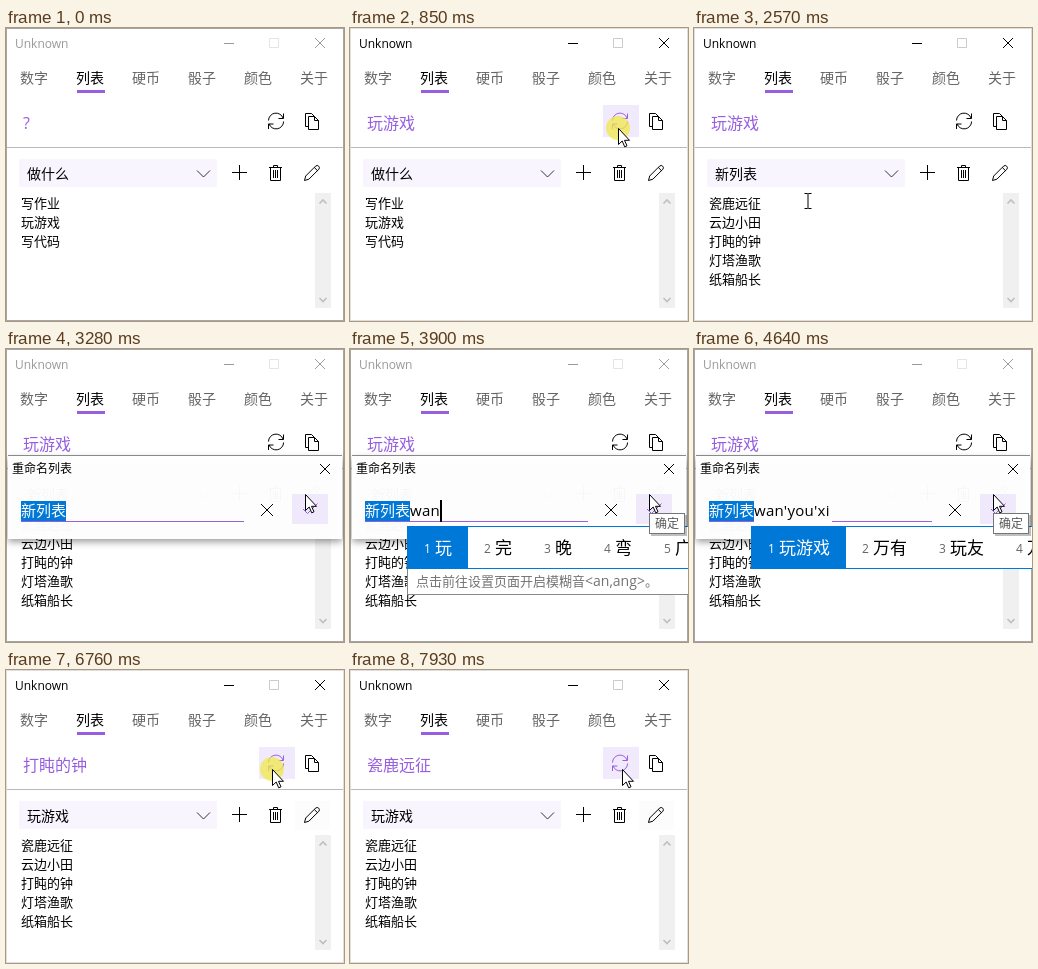
Animation, 338 px wide and 293 px high, one loop 8 s. Source, as an HTML page:

```html
<!DOCTYPE html>
<html lang="zh-CN">
<head>
<meta charset="utf-8">
<title>Unknown</title>
<style>
  html, body { margin: 0; width: 100%; height: 100%; overflow: hidden; background: #fff; }
  svg { display: block; width: 338px; height: 293px; font: 14px "Open Sans", "Noto Sans CJK SC", "Noto Sans CJK", sans-serif; }
  text { white-space: pre; }
  .line { fill: none; stroke: currentColor; }
  .caption { color: #000; font-size: 12px; }
  .caption .max { color: #ccc; }
  .away .caption { color: #999; }
  .away .caption .max { color: #e4e4e4; }
  .edge { fill: none; stroke: #dedede; }
  .away .edge { stroke: #a6a6a6; }
  .tabs { fill: #666; }
  .tabs .on { fill: #000; }
  .list { font-size: 13px; }
  .accent { fill: #975fe0; }
  .btn { color: #000; }
  .btn rect { fill: #fff; }
  .btn.saved rect { fill: #fcfcfc; }
  .btn.hot { color: #975fe0; }
  .btn.hot rect { fill: #f1e9fc; }
  #combo { fill: #f8f5fe; }
  #combo.hot { fill: #e8dcf9; }
</style>
</head>
<body>
<svg id="stage" viewBox="0 0 338 293">
  <defs>
    <clipPath id="slide"><rect id="slideBox" x="10" y="159" width="206" height="0"/></clipPath>
    <filter id="shadow" x="-10%" y="-20%" width="120%" height="150%">
      <feDropShadow dx="0" dy="3" stdDeviation="3.500" flood-color="#000" flood-opacity=".4"/>
    </filter>
  </defs>
  <rect width="338" height="293" fill="#fff"/>

  <g class="caption">
    <text x="9" y="20" fill="currentColor">Unknown</text>
    <path class="line" d="M218 15.500h10"/>
    <path class="line max" d="M263.500 10.500h9v9h-9z"/>
    <path class="line" d="M309 10l10 10M319 10l-10 10"/>
  </g>
  <g class="tabs" id="tabs"></g>
  <rect class="accent" x="71" y="62" width="28" height="3"/>
  <text class="accent" id="result" x="17" y="101" font-size="16"></text>

  <g class="btn" data-x="253" data-y="77">
    <rect x="253" y="77" width="36" height="32"/>
    <path class="line" d="M262.500 92.500a7.500 7.500 0 0 1 14.600-2.300M277.500 85.500v5h-5M277.600 93.500a7.500 7.500 0 0 1-14.600 2.300M262.500 101v-5h5"/>
  </g>
  <g class="btn" data-x="289" data-y="77">
    <rect x="289" y="77" width="36" height="32"/>
    <path class="line" d="M302.500 98.500h-3v-13h6l3 3M302.500 88.500h6l4 4v9h-10zM308.500 88.500v4h4"/>
  </g>
  <path d="M0 119.500h338" stroke="#b9b9b9"/>

  <rect id="combo" x="13" y="131" width="198" height="28"/>
  <text id="choice" x="21" y="151"></text>
  <path class="line" d="M191 142.500l6.500 6.500l6.500-6.500" color="#333"/>
  <g class="btn" data-x="216" data-y="129">
    <rect x="216" y="131" width="34" height="29"/>
    <path class="line" d="M226 144.500h15M233.500 137v15"/>
  </g>
  <g class="btn" data-x="252" data-y="129">
    <rect x="252" y="131" width="35" height="29"/>
    <path class="line" d="M263 139.500h13M267.500 139v-1.500h4v1.500M264.500 139.500v13h10v-13M267.500 142v8M269.500 142v8M271.500 142v8"/>
  </g>
  <g class="btn" data-x="288" data-y="129" id="pencil">
    <rect x="289" y="131" width="35" height="29"/>
    <path class="line" d="M298.500 152.500l1.200-4.500l10-10q1.600-1.200 3 .2t.2 3l-10 10zM308.300 139.500l3.200 3.200"/>
  </g>

  <g class="list" id="list"></g>
  <rect x="309" y="165" width="16" height="115" fill="#f0f0f0"/>
  <path d="M313.500 175.500l3.500-3.500l3.500 3.500M313.500 270l3.500 3.500l3.500-3.500" fill="none" stroke="#bfbfbf" stroke-width="1.600"/>

  <g id="popup" clip-path="url(#slide)">
    <rect x="13.500" y="159.500" width="197" height="39" fill="#fff" stroke="#ddd"/>
    <rect id="pick" x="14" width="196" height="19" fill="#e8dcf9"/>
    <text x="21" y="174">做什么</text>
    <text x="21" y="194">新列表</text>
  </g>
  <rect class="edge" x=".5" y=".5" width="337" height="292"/>

  <g id="dialog">
    <rect x="2" y="107" width="334" height="83" fill="#fff" fill-opacity=".96" filter="url(#shadow)"/>
    <path d="M2 106.500h334" stroke="#8a8a8a"/>
    <text x="6" y="124" font-size="12">重命名列表</text>
    <path class="line" d="M314 115l10 10M324 115l-10 10M255 155l12 12M267 155l-12 12"/>
    <rect x="286" y="145" width="36" height="30" fill="#f0e8fb"/>
    <path d="M297 160l4.500 4.500l10-10" fill="none" stroke="#975fe0"/>
    <path d="M15 172.500h223" stroke="#975fe0"/>
    <rect id="cover" x="60" y="172" height="1" fill="#fff"/>
    <rect id="mark" x="15" y="152" width="45" height="20" fill="#0078d7"/>
    <g font-size="15">
      <text id="name" x="15" y="167"></text>
      <text id="typed" x="60" y="167" letter-spacing=".25"></text>
    </g>
    <rect id="caret" y="151" width="2" height="22"/>
  </g>

  <g id="ime">
    <g id="hint">
      <rect x="57.500" y="219.500" width="300" height="26" fill="#fff" stroke="#888"/>
      <text x="66" y="237" font-size="13" fill="#737373">点击前往设置页面开启模糊音<tspan font-size="14">&lt;an,ang&gt;</tspan>。</text>
    </g>
    <rect x="57.500" y="177.500" width="300" height="42" fill="#fff" stroke="#0078d7"/>
    <g id="cells"></g>
  </g>

  <g id="tip">
    <rect x="301" y="166" width="36" height="21" opacity=".25"/>
    <rect x="299.500" y="164.500" width="35" height="20" fill="#fff" stroke="#767676"/>
    <text x="305" y="179" font-size="12" fill="#575757">确定</text>
  </g>

  <g id="pointer">
    <circle id="press" r="12" fill="#efe84a" opacity=".75"/>
    <path id="arrow" d="M.5.500v16l3.700-3.500l2.500 5.800l2.300-1l-2.500-5.500h5z" fill="#fff" stroke="#000"/>
    <path id="beam" d="M-3.500-7.500h3l.5.500l.5-.5h3M0-7v14M-3.500 7.500h3l.5-.5l.5.500h3" fill="none" stroke="#000"/>
  </g>
</svg>
<script>
const LOOP = 8000, ACTIVE = 760, OPEN = 2010, PICKED = 2440, ASK = 3280, COMMIT = 4820, DONE = 5290;
const $ = id => document.getElementById(id);
const todo = ["写作业", "玩游戏", "写代码"];
const games = ["瓷鹿远征", "云边小田", "打盹的钟", "灯塔渔歌", "纸箱船长"];

const results = [[0, "?"], [ACTIVE, "玩游戏"], [6760, games[2]], [7560, games[3]], [7760, games[0]]];
const choices = [[0, "做什么"], [PICKED, "新列表"], [DONE, "玩游戏"]];
const clicks = [[740, 870], [1830, 2010], [2440, 2530], [3160, 3240], [5200, 5280], [6700, 6800], [7500, 7600], [7700, 7800]];

// time, typed letters, candidates, hint row
const typing = [
  [0, "", "", false],
  [3430, "w", "我 为 无 问 玩", false],
  [3560, "wa", "哇 挖 娃 瓦 蛙", false],
  [3700, "wan", "玩 完 晚 弯 广", true],
  [4060, "wan'y", "万一 玩呀 玩游 万亿", false],
  [4260, "wan'yo", "玩哟 万一 玩游 玩", true],
  [4410, "wan'you", "万有 玩友 玩游 万", true],
  [4490, "wan'you'x", "玩游戏 万有 玩友 万", false],
  [4640, "wan'you'xi", "玩游戏 万有 玩友 万", false],
  [COMMIT, "", "", false]
];

// pointer stops: time, x, y
const route = [
  [110, 340, 200], [400, 300, 140], [650, 268, 100], [950, 268, 100], [1030, 267, 104],
  [1260, 267, 104], [1340, 281, 110], [1600, 232, 132], [1840, 189, 150], [2000, 189, 150],
  [2060, 200, 154], [2260, 125, 179], [2440, 125, 179], [2570, 114, 173], [2680, 145, 166],
  [2960, 285, 135], [3080, 303, 145], [3160, 299, 145], [5290, 299, 145], [5740, 202, 168],
  [5970, 219, 154], [6120, 219, 154], [6520, 266, 99], [7500, 266, 99], [7700, 271, 101], [7880, 272, 99]
];

const rowAt = (rows, t) => rows.findLast(r => r[0] <= t) || rows[0];
const show = (id, on) => { $(id).style.display = on ? "" : "none"; };
const within = (t, a, b) => t >= a && t < b;

function put(id, value) {
  if ($(id).textContent !== value) $(id).textContent = value;
}

function fill(id, key, build) {
  const el = $(id);
  if (el.dataset.key === key) return;
  el.dataset.key = key;
  el.innerHTML = build();
}

function pointerAt(t) {
  const i = route.findIndex(r => r[0] > t);
  if (i === 0) return route[0].slice(1);
  if (i < 0) return route.at(-1).slice(1);
  const [t0, x0, y0] = route[i - 1], [t1, x1, y1] = route[i];
  const k = (t - t0) / (t1 - t0);
  return [Math.round(x0 + (x1 - x0) * k), Math.round(y0 + (y1 - y0) * k)];
}

function cells(words) {
  let x = 58;
  return words.split(" ").map((word, i) => {
    const w = 43 + 17 * word.length, ink = i ? "#000" : "#fff";
    const cell = (i ? "" : `<rect x="57" y="177" width="${w + 1}" height="43" fill="#0078d7"/>`) +
      `<text x="${x + 16}" y="204" font-size="12" fill="${i ? "#666" : "#fff"}">${i + 1}</text>` +
      `<text x="${x + 27}" y="205" font-size="17" fill="${ink}">${word}</text>`;
    x += w;
    return cell;
  }).join("");
}

$("tabs").innerHTML = ["数字", "列表", "硬币", "骰子", "颜色", "关于"]
  .map((s, i) => `<text x="${14 + 56 * i}" y="55"${i === 1 ? ' class="on"' : ""}>${s}</text>`).join("");

function draw(t) {
  const asking = within(t, ASK, DONE), popup = within(t, OPEN, PICKED);
  const [x, y] = pointerAt(t);
  const over = (l, top, w, h) => !asking && t > 110 && within(x, l, l + w) && within(y, top, top + h);

  $("stage").classList.toggle("away", t < ACTIVE || asking);
  put("result", rowAt(results, t)[1]);
  put("choice", rowAt(choices, t)[1]);
  const items = t < PICKED ? todo : games;
  fill("list", items[0], () => items.map((s, i) => `<text x="15" y="${180 + 19 * i}">${s}</text>`).join(""));

  $("combo").classList.toggle("hot", popup || over(13, 131, 198, 28));
  $("pencil").classList.toggle("saved", t >= DONE);
  for (const b of document.querySelectorAll(".btn"))
    b.classList.toggle("hot", !popup && over(+b.dataset.x, +b.dataset.y, 36, 32));

  show("popup", popup);
  $("slideBox").setAttribute("height", Math.min(1, Math.max(0, (t - OPEN) / 200)) * 40);
  $("pick").setAttribute("y", y >= 179 ? 179 : 160);

  const [, typed, words, hint] = rowAt(typing, t);
  const sent = t >= COMMIT;
  show("dialog", asking);
  show("ime", words !== "");
  show("hint", hint);
  show("mark", !sent);
  put("name", sent ? "玩游戏" : "新列表");
  $("name").setAttribute("fill", sent ? "#000" : "#fff");
  put("typed", typed);
  fill("cells", words, () => words ? cells(words) : "");
  show("caret", (typed || sent) && !within(t, 4640, COMMIT));
  if (asking) {
    const width = typed ? Math.round($("typed").getComputedTextLength()) : 0;
    $("caret").setAttribute("x", 60 + width);
    // text split into syllables hides the field's underline
    $("cover").setAttribute("width", typed.includes("'") ? width + 2 : 0);
  }
  show("tip", within(t, 3780, 5200));

  const beam = !popup && over(13, 163, 296, 120);
  show("pointer", t >= 110);
  show("arrow", !beam);
  show("beam", beam);
  show("press", clicks.some(([a, b]) => within(t, a, b)));
  $("pointer").setAttribute("transform", `translate(${x} ${y})`);
}

const start = performance.now();
function tick() {
  draw((performance.now() - start) % LOOP);
  requestAnimationFrame(tick);
}
tick();
</script>
</body>
</html>
```
